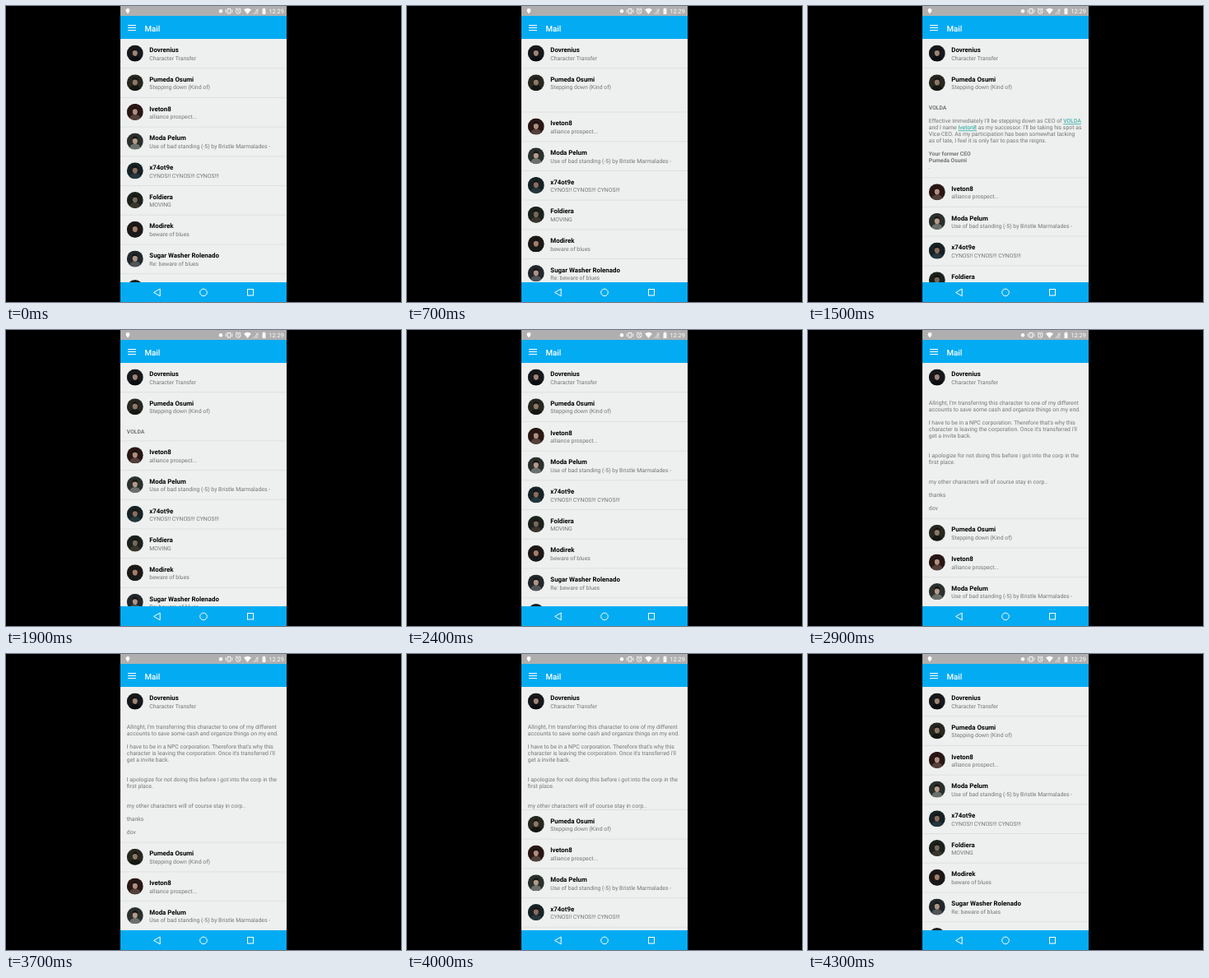
An HTML page for the animation above (4400 ms loop, 480x360 px).

```html
<!DOCTYPE html>
<html lang="en">
<head>
<meta charset="utf-8">
<title>Mail</title>
<style>
  html, body { margin: 0; width: 100%; height: 100%; overflow: hidden; background: #000; }
  svg { display: block; }
  text { font-family: Roboto, sans-serif; font-size: 6.88px; fill: #757575; text-rendering: geometricPrecision; }
  .name { font-size: 7.86px; font-weight: 700; fill: #000; }
  .bold { font-size: 6.76px; font-weight: 700; }
  .link { fill: #149f9a; text-decoration: underline; }
  .bar { fill: #03abf2; }
  .title { font-size: 9.8px; font-weight: 500; fill: #fff; }
  .clock { font-size: 7.4px; fill: #fff; }
  .icon { fill: none; stroke: #fff; }
</style>
</head>
<body>
<svg width="480" height="360" viewBox="0 0 480 360">
  <rect width="480" height="360"/>
  <svg x="139" width="202" height="360" viewBox="139 0 202 360">
    <rect x="139" width="202" height="360" fill="#edf0ee"/>
    <g id="list"></g>

    <rect x="139" width="202" height="12" fill="#afafaf"/>
    <g fill="#fff">
      <path d="M146.4 7.2L148 9.4L149.6 7.2Z"/>
      <circle cx="148" cy="5.5" r="2.4"/>
      <circle cx="261" cy="6.2" r="2.2"/>
      <path d="M289 4.4Q293.5 1 298 4.4L293.5 10Z"/>
      <path d="M306.5 2.5V10H299.5Z" opacity=".3"/>
      <path d="M311.5 3.4h1v-1h2v1h1V10h-4z" opacity=".9"/>
    </g>
    <g class="icon" stroke-width=".9">
      <rect x="269.3" y="3.4" width="3.4" height="5.6"/>
      <path d="M267.3 4.2v4M274.7 4.2v4M279 4l1.7-1.5M285.4 4l-1.7-1.5M282.2 4.8v2l1.3.8"/>
      <circle cx="282.2" cy="6.5" r="2.8"/>
      <path d="M303.5 3.5l3 3m0-3l-3 3" opacity=".5"/>
    </g>
    <text class="clock" x="337.8" y="9" text-anchor="end">12:29</text>

    <rect class="bar" x="139" y="12" width="202" height="28"/>
    <path class="icon" d="M148 23.5h10M148 26.5h10M148 29.5h10"/>
    <text class="title" x="168.4" y="30.5">Mail</text>

    <rect class="bar" x="139" y="336" width="202" height="24"/>
    <g class="icon">
      <path d="M179.6 348.4L187.2 344v8.8z"/>
      <circle cx="240" cy="348.4" r="4.3"/>
      <rect x="293.5" y="344.5" width="7" height="7.5"/>
    </g>
  </svg>
</svg>
<script>
const LOOP = 4400, STEP = 100, SLIDE = 300, TOP = 40, PITCH = 35.7, LINE = 8;

// name, subject, portrait backdrop, skin, clothing
const mails = [
  ['Dovrenius', 'Character Transfer', '#17181c', '#a08476', '#0c0d10'],
  ['Pumeda Osumi', 'Stepping down (Kind of)', '#26271f', '#8d7866', '#141612'],
  ['Iveton8', 'alliance prospect...', '#2a1613', '#ae8f80', '#53403a'],
  ['Moda Pelum', 'Use of bad standing (-5) by Bristle Marmalades -', '#2a302c', '#b39a8a', '#6c706c'],
  ['x74ot9e', 'CYNOS!! CYNOS!!! CYNOS!!!', '#162226', '#8b6c5d', '#24363b'],
  ['Foldiera', 'MOVING', '#1b211b', '#75685a', '#39352d'],
  ['Modirek', 'beware of blues', '#1d1816', '#a27e6b', '#17191a'],
  ['Sugar Washer Rolenado', 'Re: beware of blues', '#22272b', '#ac9487', '#505459'],
  ['Aldit Amol', 'beware of blues', '#1d1b18', '#8d7666', '#1a1c1f']
];

const link = s => `<tspan class="link">${s}</tspan>`;
const bold = s => `<tspan class="bold">${s}</tspan>`;

// Each body unfolds below its row; open and close are slide start times.
const bodies = {
  0: {
    size: 153.5, open: 2567, close: 3898,
    lines: [
      "Allright, I'm transferring this character to one of my different",
      'accounts to save some cash and organize things on my end.', '',
      "I have to be in a NPC corporation. Therefore that's why this",
      "character is leaving the corporation. Once it's transferred i'll",
      'get a invite back.', '', '',
      'I apologize for not doing this before i got into the corp in the',
      'first place.', '', '',
      'my other characters will of course stay in corp..', '',
      'thanks', '', 'dov'
    ]
  },
  1: {
    size: 97.3, open: 616, close: 1698,
    lines: [
      bold('VOLDA'), '',
      `Effective immediately I'll be stepping down as CEO of ${link('VOLDA')}`,
      `and I name ${link('Iveton8')} as my successor. I'll be taking his spot as`,
      'Vice-CEO. As my participation has been somewhat lacking',
      'as of late, I feel it is only fair to pass the reigns.', '',
      bold('Your former CEO'), bold('Pumeda Osumi'), '.'
    ]
  }
};

const rowMarkup = ([name, subject, back, skin, coat], i) => `
  <g class="row">
    ${i ? '<path d="M139 0h202" stroke="#dadddc" stroke-width=".8"/>' : ''}
    <svg x="146.8" y="7.5" width="20" height="20" viewBox="-10 -10 20 20">
      <circle r="10" fill="${back}"/>
      <path d="M-6.5 7.6Q-5.5 3.2 0 3.2T6.5 7.6A10 10 0 0 1-6.5 7.6Z" fill="${coat}"/>
      <ellipse cy="-1" rx="3" ry="4.4" fill="${skin}"/>
      <path d="M-3.3-1.5Q-3.6-6 0-6T3.3-1.5Q2.4-3.6 0-3.6T-3.3-1.5Z" fill="#141211"/>
    </svg>
    <text class="name" x="174.3" y="16.3">${name}</text>
    <text x="174.3" y="25.8">${subject}</text>
    ${bodies[i] ? `<svg class="body" x="138" y="${PITCH}" width="204">${
      bodies[i].lines.map((s, n) => `<text x="8.8" y="${15 + n * LINE}">${s}</text>`).join('')
    }</svg>` : ''}
  </g>`;

const list = document.getElementById('list');
list.innerHTML = mails.map(rowMarkup).join('');
const rows = [...list.querySelectorAll('.row')];

const slide = (t, start) => {
  const p = Math.min(1, Math.max(0, (t - start) / SLIDE));
  return 0.5 - 0.5 * Math.cos(Math.PI * p);
};

function draw(now) {
  const t = Math.floor(now % LOOP / STEP) * STEP;
  let y = TOP;
  rows.forEach((row, i) => {
    row.setAttribute('transform', `translate(0 ${y})`);
    y += PITCH;
    const body = bodies[i];
    if (!body) return;
    const height = body.size * (slide(t, body.open) - slide(t, body.close));
    const el = row.querySelector('.body');
    el.setAttribute('height', height);
    // The message text only appears once its space is fully open.
    const shown = t >= body.open + SLIDE && t < body.close + SLIDE;
    el.style.display = shown ? '' : 'none';
    y += height;
  });
  requestAnimationFrame(draw);
}
requestAnimationFrame(draw);
</script>
</body>
</html>
```
